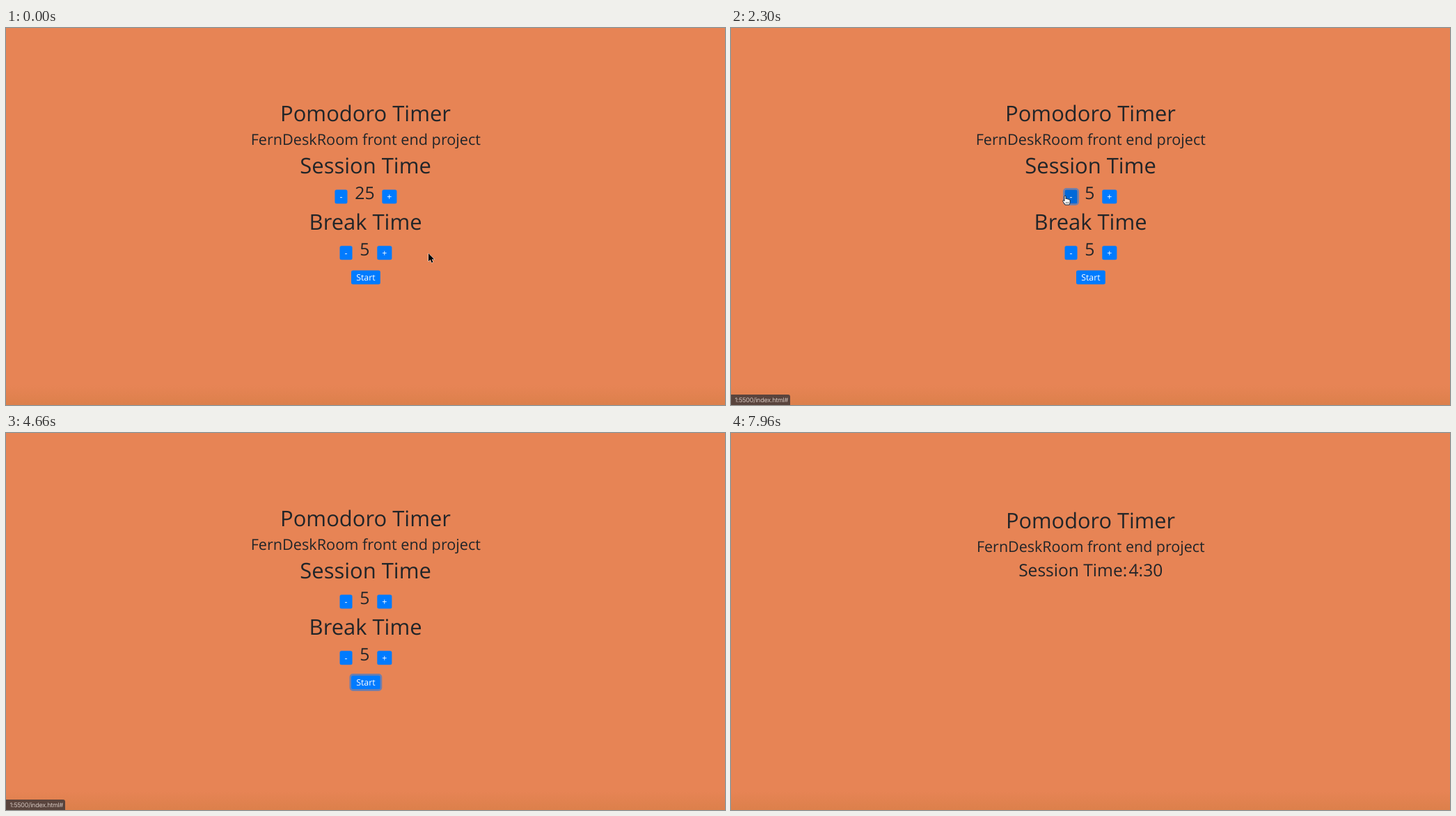
Recreate the animation shown at these times as an HTML page. Size 1033 by 542 pixels, loop 8 s.

```html
<!DOCTYPE html>
<html lang="en">
<head>
<meta charset="utf-8">
<title>Pomodoro Timer</title>
<style>
  html, body { margin: 0; width: 100%; height: 100%; overflow: hidden; background: #e78455; }
  svg { display: block; width: 1033px; height: 542px; }
  text { font-family: "Open Sans", "Noto Sans", sans-serif; fill: #212529; text-rendering: geometricPrecision; white-space: pre; }
  .h1 { font-size: 30.95px; }
  .h2 { font-size: 24.75px; }
  .h3 { font-size: 21.65px; }
  .mid { text-anchor: middle; }
  .btn text { font-size: 12.4px; fill: #fff; text-anchor: middle; }
  .ring { fill: none; stroke: #007bff; stroke-opacity: .5; stroke-width: 2.5; }
  #status text { font: 9px Inter, sans-serif; letter-spacing: -.25px; fill: #d3c4bd; text-anchor: end; }
</style>
</head>
<body>
<svg id="stage" viewBox="0 0 1033 542">
  <defs>
    <linearGradient id="shade" x1="0" y1="0" x2="0" y2="1">
      <stop offset="0" stop-color="#c87838" stop-opacity="0"/>
      <stop offset="1" stop-color="#c87838" stop-opacity=".35"/>
    </linearGradient>
    <g id="head">
      <text class="h1 mid" x="516.5" y="133.5">Pomodoro Timer</text>
      <text class="h3 mid" x="516.8" y="167.6">FernDeskRoom front end project</text>
    </g>
  </defs>
  <rect width="1033" height="542" fill="#e78455"/>
  <rect y="514" width="1033" height="28" fill="url(#shade)"/>
  <g id="page">
    <use href="#head"/>
    <g id="setup">
      <text class="h1 mid" x="516.6" y="208.8">Session Time</text>
      <text class="h1 mid" x="516.6" y="290.2">Break Time</text>
    </g>
    <g id="run">
      <text class="h2" x="412.3" y="202.9">Session Time:</text>
      <text class="h2" id="clock" x="572" y="202.9">4:59</text>
    </g>
  </g>
  <g id="later" transform="matrix(.992 0 0 .992 4.13 4.4)">
    <use href="#head"/>
    <text class="h2" x="412.3" y="202.9">Session Time:</text>
    <text class="h2" x="572" y="202.9">4:30</text>
  </g>
  <g id="status">
    <path d="M0 527H82Q85 527 85 530V542H0Z" fill="#3c383a" fill-opacity=".82"/>
    <text x="82" y="538">1:5500/index.html#</text>
  </g>
  <g id="cursor">
    <path id="arrow" d="M0 0V11.6L2.7 9.1L4.6 13.4L6.5 12.6L4.7 8.4H8.3Z"
      fill="#000" stroke="#fff" stroke-width="1" stroke-linejoin="round" paint-order="stroke"/>
    <g id="hand" stroke="#000" stroke-width=".8" stroke-linejoin="round">
      <path fill="#fff" d="M-1.1 1C-1.1-.3 1-.3 1 1V4.6C1.3 3.7 3 3.8 3 5C3.5 4.4 5 4.6 5 5.7C5.6 5.2 7 5.4 7 6.7V9.4C7 11 6 11.8 6 13H-.2C-.4 11.6-2 10-3.3 8.2C-4.1 7-2.6 6-1.1 7.7Z"/>
      <path fill="none" stroke-width=".6" d="M1.2 9V11.2M2.9 9V11.2M4.6 9V11.2"/>
    </g>
  </g>
</svg>
<script>
const LOOP = 8000;
const $ = id => document.getElementById(id);

function make(tag, attrs, parent) {
  const el = document.createElementNS("http://www.w3.org/2000/svg", tag);
  for (const k in attrs) el.setAttribute(k, attrs[k]);
  return parent.appendChild(el);
}

// Button with its centre line at y; place() sets the left edge.
function button(label, w, y) {
  const g = make("g", { class: "btn" }, $("setup"));
  const ring = make("rect", { class: "ring", x: -1.25, y: y - 11.25, width: w + 2.5, height: 22.5, rx: 3.7, opacity: 0 }, g);
  const face = make("rect", { y: y - 10, width: w, height: 20, rx: 2.5, fill: "#007bff" }, g);
  make("text", { x: w / 2, y: y + 4.8 }, g).textContent = label;
  return {
    w,
    place: x => g.setAttribute("transform", `translate(${x} 0)`),
    focus: a => ring.setAttribute("opacity", a),
    hover: a => face.setAttribute("fill", `rgb(0 ${123 - 18 * a} ${255 - 38 * a})`)
  };
}

function row(y) {
  const minus = button("-", 18, y), plus = button("+", 21.1, y);
  const num = make("text", { class: "h2", y: y + 3.4 }, $("setup"));
  const gap = 10.8;
  return {
    minus,
    set(n) {
      const nw = String(n).length * 14.15;
      const x = 516.95 - (minus.w + plus.w + nw + 2 * gap) / 2;
      minus.place(x);
      num.setAttribute("x", x + minus.w + gap);
      plus.place(x + minus.w + nw + 2 * gap);
      num.textContent = n;
    }
  };
}

const session = row(242.5), rest = row(323.3);
const start = button("Start", 41.8, 358.5);
rest.set(5);
start.place(496);

// Linear value from [time, value] pairs.
function at(keys, t) {
  if (t <= keys[0][0]) return keys[0][1];
  for (let i = 1; i < keys.length; i++) {
    const [a, va] = keys[i - 1], [b, vb] = keys[i];
    if (t < b) return va + (vb - va) * (t - a) / (b - a);
  }
  return keys[keys.length - 1][1];
}

const minusHover = [[960, 0], [1030, 1], [2330, 1], [2430, 0]];
const minusFocus = [[1225, 0], [1480, 1], [3955, 1], [4130, 0]];
const startHover = [[400, 0], [450, .8], [500, .8], [570, 0], [3390, 0], [3480, 1], [4360, 1], [4460, 0]];
const startFocus = [[3955, 0], [4130, 1]];
const statusFade = [[1685, 0], [1730, 1], [2785, 1], [2800, .95], [2900, .4], [2967, 0],
  [3655, 0], [3656, .4], [3730, 1], [4725, 1], [4730, .75], [4830, 0]];

// Cursor moves: start, end, points passed.
const moves = [
  [190, 1000, [[607, 324], [560, 345], [510, 352], [450, 318], [422, 255], [436, 215], [465, 226], [480, 240]]],
  [1010, 1060, [[480, 240], [480, 241]]],
  [2290, 2635, [[480, 241], [500, 275], [528, 330], [548, 367]]],
  [3120, 3500, [[548, 367], [541, 366], [528, 362], [519.5, 358.5]]],
  [4320, 4650, [[519.5, 358.5], [640, 385], [850, 450], [1006, 546]]]
];

function spline(p, u) {
  const n = p.length - 1, s = u * n, i = Math.min(n - 1, Math.floor(s)), f = s - i;
  const q = k => p[Math.max(0, Math.min(n, k))];
  return [0, 1].map(d => {
    const a = q(i - 1)[d], b = q(i)[d], c = q(i + 1)[d], e = q(i + 2)[d];
    return b + f / 2 * (c - a + f * (2 * a - 5 * b + 4 * c - e + f * (3 * (b - c) + e - a)));
  });
}

function cursorAt(t) {
  let pos = moves[0][2][0];
  for (const [a, b, pts] of moves) {
    if (t < a) break;
    const u = Math.min(1, (t - a) / (b - a));
    pos = spline(pts, u * u * (3 - 2 * u));
  }
  return pos;
}

const show = (el, on) => el.setAttribute("visibility", on ? "visible" : "hidden");

function draw(t) {
  const ticks = Math.max(0, Math.min(10, Math.floor((t - 1225) / 33.33) + 1));
  session.set(25 - 2 * ticks);
  session.minus.hover(at(minusHover, t));
  session.minus.focus(at(minusFocus, t));
  start.hover(at(startHover, t));
  start.focus(at(startFocus, t));
  $("status").setAttribute("opacity", at(statusFade, t));

  const [x, y] = cursorAt(t);
  const overStart = x > 496 && x < 538 && y > 348 && y < 369;
  const overMinus = x > 472 && x < 491 && y > 232 && y < 253;
  $("cursor").setAttribute("transform", `translate(${x} ${y})`);
  show($("cursor"), t < 4650);
  $("hand").style.display = overStart || overMinus ? "" : "none";
  $("arrow").style.display = overStart || overMinus ? "none" : "";

  const running = t >= 5055;
  show($("setup"), !running);
  show($("run"), running);
  $("clock").textContent = "4:" + (59 - Math.max(0, Math.floor((t - 5055) / 1000)));

  const mix = at([[7575, 0], [7955, 1]], t);
  $("page").setAttribute("opacity", 1 - mix);
  $("later").setAttribute("opacity", mix);
}

const t0 = performance.now();
function frame() {
  draw((performance.now() - t0) % LOOP);
  requestAnimationFrame(frame);
}
draw(0);
requestAnimationFrame(frame);
</script>
</body>
</html>
```
